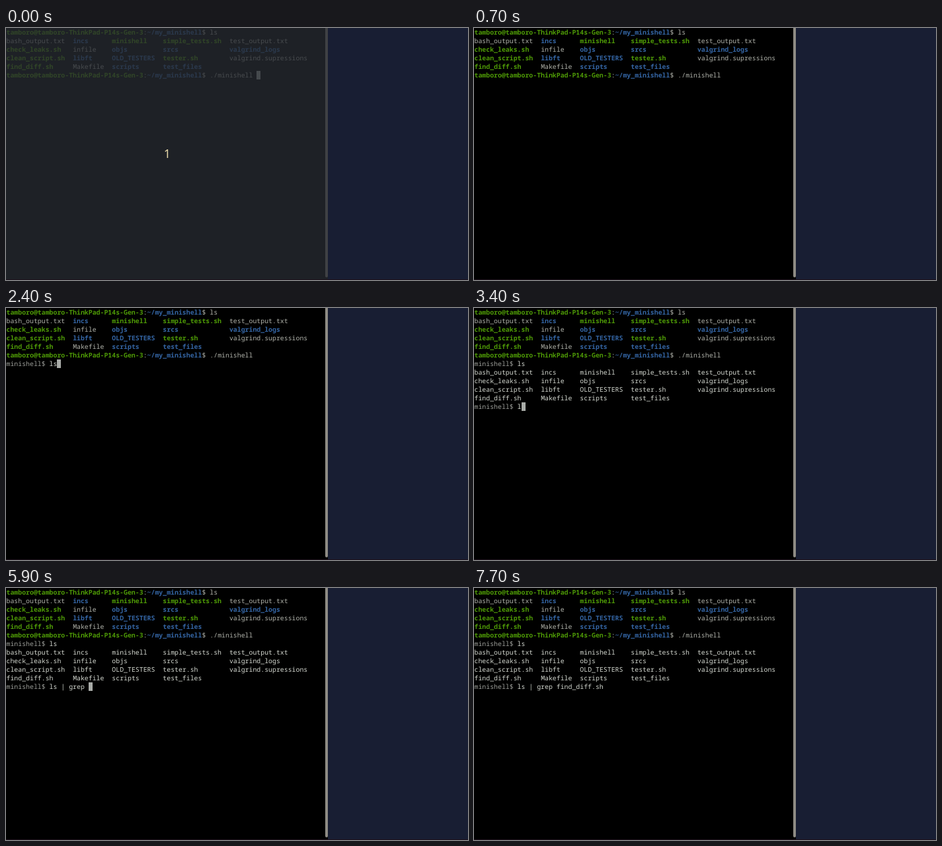
Recreate the animation shown at these times as an HTML page. Size 699 by 382 pixels, loop 8000 ms.

```html
<!DOCTYPE html>
<html lang="en">
<head>
<meta charset="utf-8">
<title>Minishell session</title>
<style>
  html, body { margin: 0; width: 100%; height: 100%; overflow: hidden; background: #000; }
  #stage { position: relative; width: 699px; height: 382px; overflow: hidden; background: #000; }
  #stage div, #stage span { position: absolute; }
  #screen { left: 0.5px; top: -0.5px; }
  #screen span {
    font: 9.867px/13px "Noto Sans Mono", "DejaVu Sans Mono", monospace;
    text-rendering: geometricPrecision;
    white-space: pre;
  }
  #screen .green { color: #4e9a06; font-weight: 700; }
  #screen .blue { color: #3465a4; font-weight: 700; }
  #screen .grey { color: #b0b2aa; }
  #screen .dim { color: #9b9d98; }
  #screen .light { color: #d3d7cf; }
  #cursor { width: 6px; height: 13px; background: #a9aca8; }
  #bar { left: 483px; top: 0; width: 4px; height: 378px; border-radius: 0 0 2px 2px; background: #8e8c84; }
  #side { left: 487px; top: 0; width: 212px; height: 381px; background: #181e33; }
  #edge { left: 0; top: 381px; width: 699px; height: 1px; background: #1d111b; }
  #veil { left: 0; top: 0; width: 487px; height: 381px; background: rgba(39, 44, 50, .77); }
  #count {
    left: 224px; top: 179px; width: 40px; text-align: center;
    font: 18px/22px "Noto Sans", "Open Sans", sans-serif; color: #e6d7a8;
  }
</style>
</head>
<body>
<div id="stage">
  <div id="screen"><div id="cursor"></div></div>
  <div id="bar"></div>
  <div id="side"></div>
  <div id="edge"></div>
  <div id="veil"><div id="count">1</div></div>
</div>
<script>
const LOOP = 8000, CELL = 5.92, ROW = 13;
const VEIL_END = 700;
const PROMPT = "minishell$ ";
const SHELL = 0, FIRST = 1, SECOND = 2;

// [start ms, stage, typed text, cursor visible]
const steps = [
  [0, SHELL, "", true],
  [600, SHELL, "", false],
  [1200, SHELL, "", true],
  [1600, FIRST, "", true],
  [2200, FIRST, "", false],
  [2300, FIRST, "l", true],
  [2400, FIRST, "ls", true],
  [2500, SECOND, "", true],
  [3100, SECOND, "", false],
  [3400, SECOND, "l", true],
  [3500, SECOND, "ls", true],
  [4000, SECOND, "ls ", true],
  [4800, SECOND, "ls |", true],
  [5100, SECOND, "ls | ", true],
  [5300, SECOND, "ls | g", true],
  [5500, SECOND, "ls | gr", true],
  [5700, SECOND, "ls | gre", true],
  [5800, SECOND, "ls | grep", true],
  [5900, SECOND, "ls | grep ", true],
  [6400, SECOND, "ls | grep ", false],
  [6500, SECOND, "ls | grep f", true],
  [6800, SECOND, "ls | grep fi", true],
  [6900, SECOND, "ls | grep fin", true],
  [7100, SECOND, "ls | grep find_diff.sh ", true],
  [7700, SECOND, "ls | grep find_diff.sh ", false]
];

// A leading * marks an executable, / a directory
const listing = [
  "bash_output.txt /incs *minishell *simple_tests.sh test_output.txt",
  "*check_leaks.sh infile /objs /srcs /valgrind_logs",
  "*clean_script.sh /libft /OLD_TESTERS *tester.sh valgrind.supressions",
  "*find_diff.sh Makefile /scripts /test_files"
];
const columns = [0, 17, 27, 40, 57];

const $ = id => document.getElementById(id);
const screen = $("screen"), cursor = $("cursor"), veil = $("veil");

function place(el, col, row) {
  el.style.left = col * CELL + "px";
  el.style.top = row * ROW + "px";
}

function put(text, col, row, style) {
  const el = document.createElement("span");
  el.className = style;
  el.textContent = text;
  place(el, col, row);
  screen.append(el);
  return el;
}

function shellLine(row, command) {
  put("tamboro@tamboro-ThinkPad-P14s-Gen-3", 0, row, "green");
  put(":", 35, row, "grey");
  put("~/my_minishell", 36, row, "blue");
  put("$ " + command, 50, row, "grey");
}

function list(top, coloured) {
  const styles = { "*": "green", "/": "blue" };
  return listing.flatMap((line, r) => line.split(" ").map((item, c) => {
    const style = coloured ? styles[item[0]] || "grey" : "light";
    return put(item.replace(/^[*\/]/, ""), columns[c], top + r, style);
  }));
}

const show = (el, on) => { el.style.visibility = on ? "visible" : "hidden"; };

shellLine(0, "ls");
list(1, true);
shellLine(5, "./minishell");
const prompt1 = put(PROMPT, 0, 6, "dim");
const input1 = put("", PROMPT.length, 6, "light");
const output = list(7, false);
const prompt2 = put(PROMPT, 0, 11, "dim");
const input2 = put("", PROMPT.length, 11, "light");

function draw(step) {
  const [, stage, typed, blink] = step;
  show(prompt1, stage >= FIRST);
  input1.textContent = stage === FIRST ? typed : stage === SECOND ? "ls" : "";
  output.forEach(el => show(el, stage === SECOND));
  show(prompt2, stage === SECOND);
  input2.textContent = stage === SECOND ? typed : "";
  const col = stage === SHELL ? 64 : PROMPT.length + typed.length;
  place(cursor, col, [5, 6, 11][stage]);
  show(cursor, blink);
}

const start = performance.now();
let last;

function tick() {
  const t = (performance.now() - start) % LOOP;
  const step = steps.findLast(s => s[0] <= t);
  if (step !== last) draw(last = step);
  veil.style.display = t < VEIL_END ? "block" : "none";
  requestAnimationFrame(tick);
}
tick();
</script>
</body>
</html>
```
